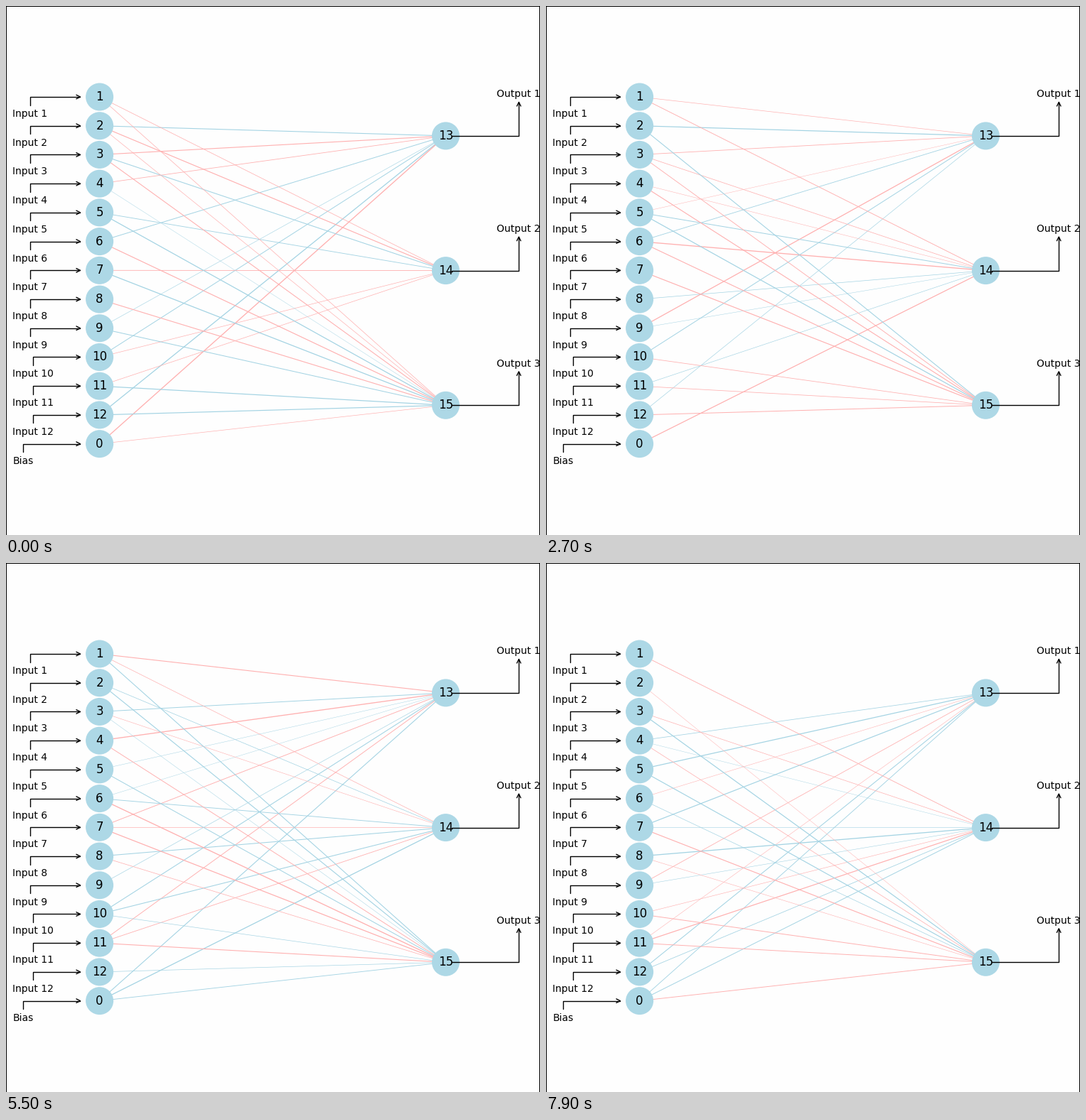
Recreate the animation shown at these times as a matplotlib script. Size 751 by 745 pixels, loop 8000 ms.

```python
import numpy as np
import matplotlib.pyplot as plt
from matplotlib.animation import FuncAnimation
from matplotlib.collections import LineCollection
from matplotlib.patches import Circle, FancyArrowPatch, Rectangle

W, H, DPI = 751, 745, 100
FRAMES, INTERVAL = 80, 100
NODE_BLUE, EDGE_BLUE, EDGE_RED = "#add8e6", "#a3d3e3", "#ffb0b0"
N_IN, N_OUT = 13, 3
ACTIVE, RED_SHARE = 0.74, 0.57  # share of visible edges, and of red among them

plt.rcParams["font.family"] = "DejaVu Sans"

IN_X, OUT_X = 131.6, 618.4
LABEL_X, OUT_LABEL_X = 9.2, 690.5
in_y = 128 + 40.72 * np.arange(N_IN)
out_y = 182.9 + 189.7 * np.arange(N_OUT)

fig = plt.figure(figsize=(W / DPI, H / DPI), dpi=DPI, facecolor="#fefefe")
ax = fig.add_axes([0, 0, 1, 1])
ax.set(xlim=(0, W), ylim=(H, 0))
ax.axis("off")


def node(x, y, label):
    ax.add_patch(Circle((x, y), 19.5, fc=NODE_BLUE, ec="none", zorder=2))
    ax.text(x, y, label, size=12, ha="center", va="center", zorder=4)


def arrow(start, end, angle_a, angle_b):
    style = f"angle,angleA={angle_a},angleB={angle_b},rad=0"
    ax.add_patch(FancyArrowPatch(
        start, end, arrowstyle="->", connectionstyle=style, mutation_scale=10,
        shrinkA=0, shrinkB=0, lw=1, color="black", zorder=3))


def label(x, y, text):
    """Write a label and return the x of its middle."""
    box = ax.text(x, y, text, size=10).get_window_extent()
    return x + box.width / 2


for i, y in enumerate(in_y, start=1):
    is_bias = i == N_IN
    node(IN_X, y, str(i % N_IN))
    middle = label(LABEL_X, y + 28, "Bias" if is_bias else f"Input {i}")
    arrow((middle, y + 11.5), (106, y), 90, 0)

for i, y in enumerate(out_y, start=1):
    node(OUT_X, y, str(N_IN + i - 1))
    middle = label(OUT_LABEL_X, y - 54.5, f"Output {i}")
    arrow((627, y), (middle, y - 49), 0, 90)

for x, y, w, h in [(0, 0, 1, H), (0, 0, W, 1), (W - 1, 0, 1, H)]:
    ax.add_patch(Rectangle((x, y), w, h, fc="black", ec="none", zorder=5))

edges = LineCollection(
    [[(IN_X, a), (OUT_X, b)] for b in out_y for a in in_y], zorder=1)
ax.add_collection(edges)


def update(step):
    """Each step shows a new network: random signs, strengths and gaps."""
    rng = np.random.default_rng(100 + step)
    active, sign, strength = rng.random((3, N_IN * N_OUT))
    edges.set_linewidth(np.where(active < ACTIVE, 0.3 + 0.65 * strength, 0))
    edges.set_color([EDGE_RED if s < RED_SHARE else EDGE_BLUE for s in sign])
    return [edges]


anim = FuncAnimation(fig, update, frames=FRAMES, interval=INTERVAL,
                     repeat=True, repeat_delay=0)
plt.show()
```
